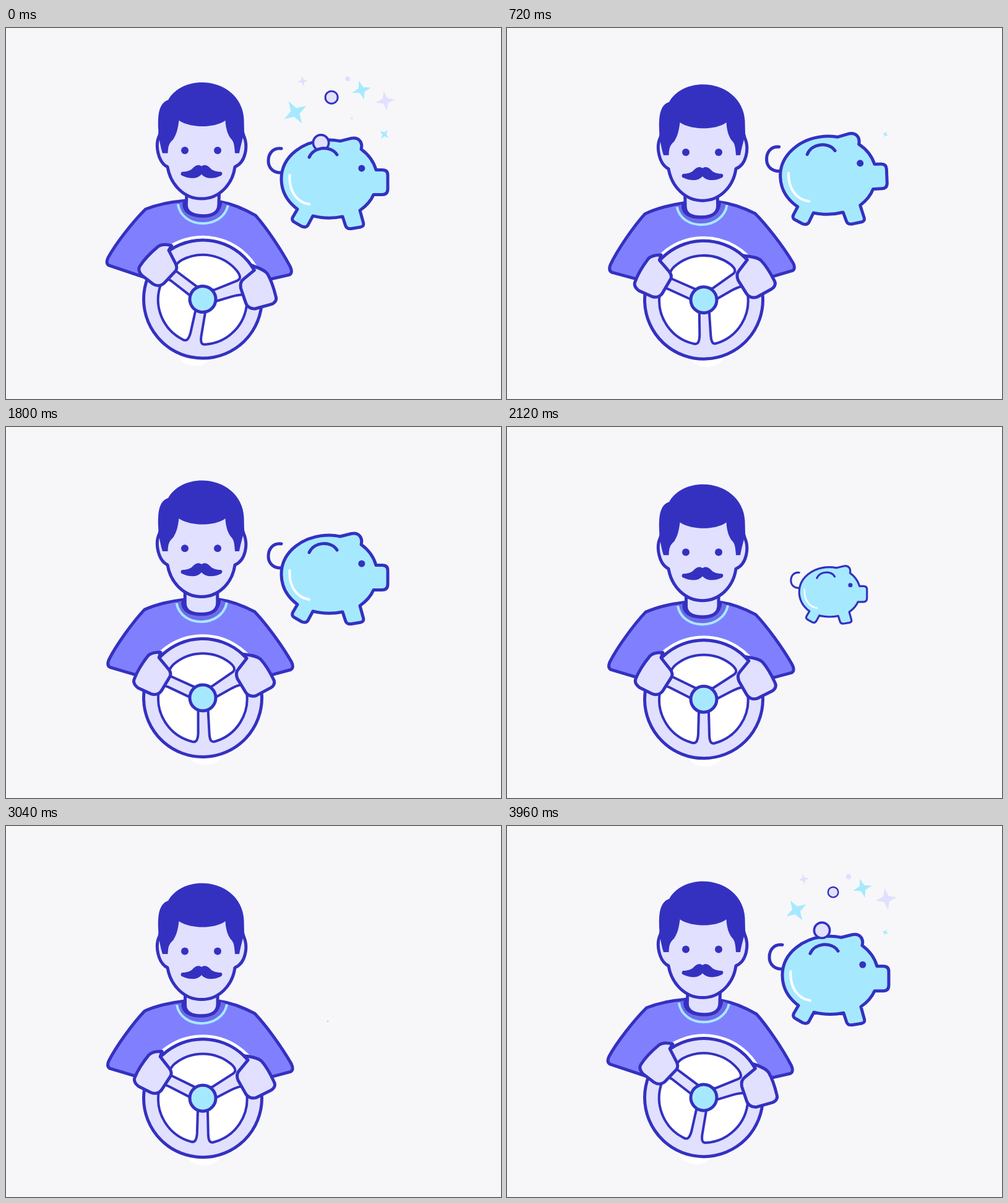
An HTML page for the animation above (4 s loop, 800 by 600 pixels).

```html
<!DOCTYPE html>
<html lang="en">
<head>
<meta charset="utf-8">
<title>Driver and piggy bank</title>
<style>
  html, body { margin: 0; width: 100%; height: 100%; overflow: hidden; background: #f7f7fa; }
  svg { display: block; width: 100vw; height: 100vh; }
  .line { fill: none; stroke: #3431c1; stroke-width: 5; stroke-linecap: round; stroke-linejoin: round; }
  .ink { fill: #3431c1; }
  .pale { fill: #e1e0ff; }
  .cyan { fill: #a6e9ff; }
  .shirt { fill: #8080ff; }
  .white { fill: #fff; }
  .thin { stroke-width: 4; }
</style>
</head>
<body>
<svg viewBox="0 0 800 600">
  <defs>
    <clipPath id="above-slot">
      <path d="M400 0H660V199H535C526 184 498 185 490 203H400Z"/>
    </clipPath>
  </defs>

  <g id="body">
    <path class="line shirt" d="M287 279C262 282 240 288 224 295C205 315 178 352 166 376C164 381 164 386 168 388L225 405H415L460 393C464 391 464 386 461 380C445 352 420 318 402 299C385 290 367 282 345 279Z"/>
    <path d="M276 285C283 325 349 325 357 284L345 279H287Z" fill="#6f6bec"/>
    <path d="M276 285C283 325 349 325 357 284" fill="none" stroke="#a6e9ff" stroke-width="4"/>
    <path class="line" d="M286 280V287C288 298 298 303 316 303C333 303 343 297 345 280"/>
    <path class="line pale" d="M289.5 255V286C290 297 300 302.5 316 302.5C332 302.5 342 297 342 284V255Z"/>
  </g>

  <g id="wheel">
    <path d="M-87-50A100.5 100.5 0 0 1 87-50" fill="none" stroke="#fff" stroke-width="5"/>
    <ellipse class="white" cx="2" cy="91" rx="27" ry="17.5"/>
    <circle class="line pale" r="95.5"/>
    <path class="line white thin" d="M-13-18L-51-36.5C-56-40-53-49-45-56A72 72 0 0 1 45-56C53-49 54.5-44 49-40L15-18Z"/>
    <path class="line white thin" d="M-8 20L-9 57C-10 69-13 72.5-20 70A72 72 0 0 1-71-11C-70-21-64-23-56-19.5L-20.5-1.5Z"/>
    <path class="line white thin" d="M8 20L9 59C9.5 69 12 73 18 71A72 72 0 0 0 71-8C72-16 70-21 61-19C55-18 50-15.5 45-13L22-1Z"/>
    <circle class="line cyan" r="21"/>
    <g transform="translate(-318 -438)">
      <path class="line pale" d="M252 362.5C243 362 235 364 231 368C222 379 213 392 208 405C206 410 209 415 214 419L234 429C241 432 248 430 252 424L266 402C268 398 267 394 264 390L249 371Z"/>
      <path class="line pale" d="M384 369L391 376L377 393C372 398 373 404 375 409L387 430C390 436 397 439 404 437L428 425C434 422 436 416 433 411C427 398 420 386 413 378C407 372 395 371 384 369Z"/>
    </g>
  </g>

  <g id="head">
    <path class="line pale" d="M248 172C240 188 246 216 261 223C266 252 288 274.5 316 274.5C344 274.5 366 252 370 223C387 216 392 190 384 172L370 120H260Z"/>
    <path class="ink" d="M253 201C248 185 245 165 246 145C247 128 252 118 262 115C272 97 293 86.5 317 86.5C352 86.5 383 110 384.5 146L385 167C382 180 379 190 377 201H370C369 186 368 182 363 177C358 170 355 160 354.5 148C345 155 330 157.5 318 157.5C305 157.5 290 155 279.5 148C278 160 276 170 270 179C263 185 262 190 261.5 201Z"/>
    <circle class="ink" cx="289" cy="196.3" r="6"/>
    <circle class="ink" cx="342" cy="196.3" r="6"/>
    <path class="ink" d="M316 222C312 219 307 220 303 224C298 230 291 231 285 231C282 232 282 236 284 237C296 243 310 243 316 235C322 243 337 243 348 237C350 235 350 232 347 231C341 231 334 230 329 224C325 220 320 219 316 222Z"/>
  </g>

  <g id="sparkles"></g>

  <g id="pig">
    <path class="line" d="M445 189C431 187 424 198 424 209C424 221 433 229 446 228"/>
    <path class="line cyan" d="M540 177L558 172.5C570 170 577 179 574 190C585 198 594 209 598 223.5H608C614 223.5 617 226 617 232V254C617 260 614 263.5 608 263.5H594C590 273 582 282 572 289L577.5 309C578.5 313 577 315 573 316L558 318.5C553 319 550 318 548.5 313L544 299C530 302 512 302 496 298L489 311C487 316 483 317 478 315L466 308C462 306 462 302 464 299L471 287C455 275 445 258 445 238C445 202 480 175 523 175C529 175 535 176 540 177Z"/>
    <path d="M458.5 232C457 258 470 276 490 279" fill="none" stroke="#fff" stroke-width="4" stroke-linecap="round"/>
    <circle class="ink" cx="574.8" cy="221" r="5.5"/>
    <g id="coins" clip-path="url(#above-slot)"></g>
    <path class="line" d="M490 203C498 185 526 184 535 199"/>
  </g>
</svg>
<script>
const LOOP = 4000;
const PALE = '#e1e0ff', CYAN = '#a6e9ff';
const byId = id => document.getElementById(id);

function add(parent, tag, attributes) {
  const node = document.createElementNS('http://www.w3.org/2000/svg', tag);
  for (const name in attributes) node.setAttribute(name, attributes[name]);
  return byId(parent).appendChild(node);
}
const place = (node, transform) => node.setAttribute('transform', transform);

const ease = u => u < .5 ? 4 * u ** 3 : 1 - 4 * (1 - u) ** 3;

// Eased value between [time, value] keys, held outside them.
function track(t, keys) {
  if (t <= keys[0][0]) return keys[0][1];
  for (let i = 1; i < keys.length; i++) {
    const [t0, a] = keys[i - 1], [t1, b] = keys[i];
    if (t < t1) return a + (b - a) * ease((t - t0) / (t1 - t0));
  }
  return keys[keys.length - 1][1];
}

const BOB = [[-240, 6.3], [160, 0], [560, 6.3], [960, 0]];
const STEER = [[0, 11], [1160, -6], [2240, 0], [2880, 0], [3920, 11]];
const LEAN = [[0, 2], [760, -1.5], [1240, -1.5], [2080, 0], [2880, 0], [3920, 2]];
const WOBBLE = [[560, 0], [720, -2.4], [900, 1.4], [1100, 0]];
const POP = [[2990, 0], [3330, 1.06], [3500, 1]];

// Sparkle and coin times are relative to the loop point.
const STAR = Array.from({length: 8}, (_, i) => {
  const angle = i * Math.PI / 4, r = i % 2 ? .35 : 1;
  return `${r * Math.cos(angle)},${r * Math.sin(angle)}`;
}).join(' ');
const appear = (size, a, b, c, d) => [[a, 0], [b, size], [c, size], [d, 0]];
const sparkles = [
  {x: 467.5, y: 136.5, color: CYAN, turn: -31, keys: appear(22.5, -340, 120, 400, 740)},
  {x: 574.5, y: 100.5, color: CYAN, turn: -15, keys: appear(15.8, -500, -150, 300, 640)},
  {x: 613, y: 118, color: PALE, turn: -9, keys: [[-560, 0], [-200, 20], [160, 14], [420, 20], [760, 0]]},
  {x: 479.5, y: 86, color: PALE, turn: -12, keys: appear(8.7, -600, -200, 200, 560)},
  {x: 611.5, y: 172, color: CYAN, turn: 0, spin: 4.3, keys: appear(10.5, -160, 80, 580, 860)},
  {x: 552, y: 82, color: PALE, dot: true, keys: [[-480, 0], [-120, 4.6], [240, 0]]},
  {x: 559, y: 146, color: PALE, dot: true, keys: [[-120, 0], [120, 4], [420, 0]]}
];
for (const s of sparkles) {
  s.node = s.dot ? add('sparkles', 'circle', {r: 1, fill: s.color})
                 : add('sparkles', 'polygon', {points: STAR, fill: s.color});
}

const coins = [{start: -371, drift: 0}, {start: -126, drift: 19}, {start: 120, drift: 0}];
for (const c of coins) {
  c.node = add('coins', 'circle', {r: 12.6, fill: PALE, stroke: '#3431c1', 'stroke-width': 3.7});
}

function pigScale(t) {
  if (t < 1880) return 1;
  if (t < 2280) return 1 - ((t - 1880) / 400) ** 2;
  return track(t, POP);
}

function drawPig(t, s) {
  let dip = 0;
  for (const c of coins) {
    const offset = (s - c.start - 394) / 125;
    if (Math.abs(offset) < 1) dip += 6.4 * Math.cos(offset * Math.PI / 2) ** 2;
  }
  for (const c of coins) {
    const age = s - c.start;
    const visible = age > 0 && age < 460;
    c.node.style.display = visible ? '' : 'none';
    if (!visible) continue;
    const x = 509 + c.drift * Math.max(0, 1 - (age / 400) ** 2);
    const y = 102.5 + .0006 * age * age - dip;
    const size = Math.sqrt(Math.min(1, age / 200));
    place(c.node, `translate(${x} ${y}) scale(${size})`);
  }
  place(byId('pig'), `translate(520 ${317 + dip}) rotate(${track(t, WOBBLE)}) scale(${pigScale(t)}) translate(-520 -317)`);
}

function draw(t) {
  const s = t < LOOP / 2 ? t : t - LOOP;
  const bob = track(t % 800, BOB);
  place(byId('head'), `translate(0 ${bob})`);
  place(byId('body'), `translate(0 ${bob * .7}) rotate(${track(t, LEAN)} 315 338)`);
  place(byId('wheel'), `translate(318 ${438 + bob * .36}) rotate(${track(t, STEER)})`);
  for (const p of sparkles) {
    const size = track(s, p.keys);
    place(p.node, `translate(${p.x} ${p.y}) rotate(${(p.turn || 0) + (p.spin || 0) * size}) scale(${size})`);
  }
  drawPig(t, s);
}

const begin = performance.now();
function tick() {
  draw((performance.now() - begin) % LOOP);
  requestAnimationFrame(tick);
}
tick();
</script>
</body>
</html>
```
